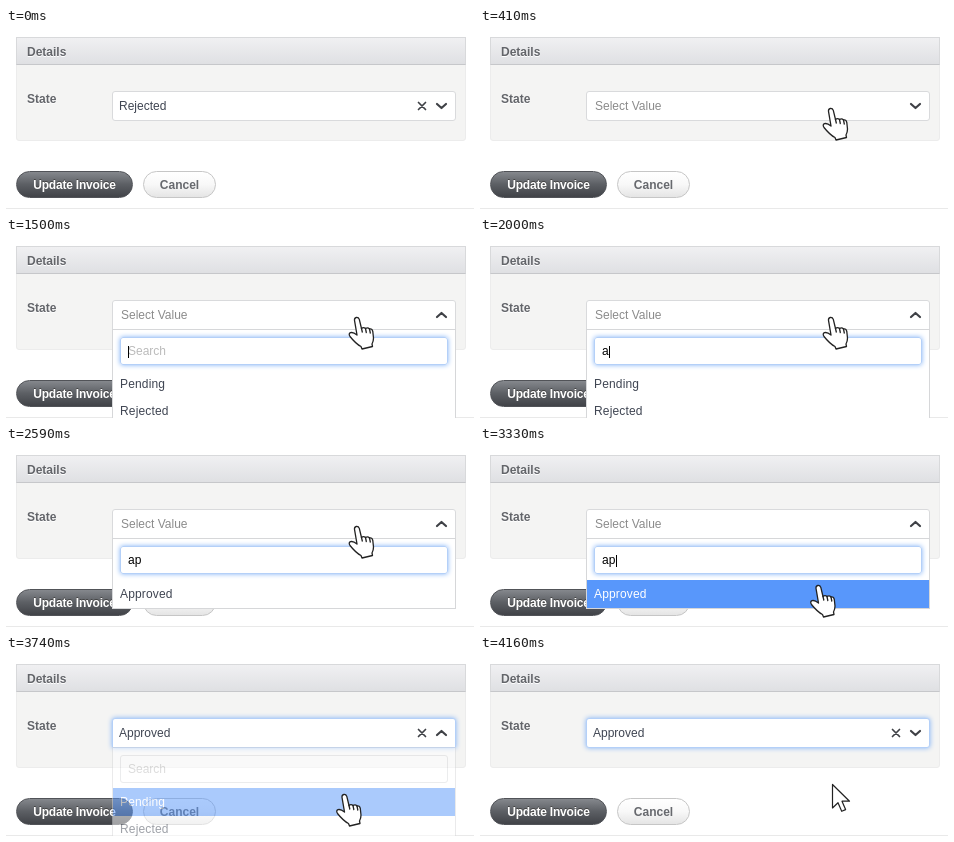
An HTML page that plays this animation: 468x181 px, repeating every 4.24 s.

```html
<!DOCTYPE html>
<html lang="en">
<head>
<meta charset="utf-8">
<title>State picker</title>
<style>
html, body { margin: 0; width: 100%; height: 100%; overflow: hidden; background: #fff; }
body { position: relative; font: 12px/14px "Liberation Sans", Arial, sans-serif; color: #3f4552; }
div, svg { position: absolute; box-sizing: border-box; white-space: pre; }
#panel { left: 10px; top: 9px; width: 450px; height: 104px; background: #f4f4f3; border: 1px solid #ececec; border-radius: 3px; }
#head { left: 10px; top: 9px; width: 450px; height: 28px; background: linear-gradient(#f0f0f2, #dfe0e3); border: 1px solid #d8d9db; border-bottom-color: #c6c7ca; }
.label { left: 21px; font-weight: bold; color: #63656a; text-shadow: 0 1px #fff; }
.button { top: 143px; height: 27px; border-radius: 14px; font-weight: bold; line-height: 26px; text-align: center; }
#update { left: 10px; width: 117px; color: #fff; background: linear-gradient(#85888d, #5c5f64 50%, #414348); border: 1px solid #515358; text-shadow: 0 -1px #444; letter-spacing: -.2px; }
#cancel { left: 137px; width: 73px; color: #67696e; background: linear-gradient(#fff, #f8f8f8 50%, #e5e5e5); border: 1px solid #c6c6c6; }
#rule { left: 0; top: 180px; width: 468px; height: 1px; background: #e9e9e9; }
#select { left: 106px; top: 63px; width: 344px; height: 30px; background: #fff; border: 1px solid #d9dadc; border-radius: 3px; }
#select.open { border-radius: 3px 3px 0 0; }
#select.glow { border-color: #b4d0f8; box-shadow: 0 0 5px #82b2f6; }
#value { left: 6px; top: 7px; }
#value.empty { left: 8px; color: #8b8b8b; }
#list { left: 106px; top: 92px; width: 344px; background: #fff; border: 1px solid #d6d7d9; overflow: hidden; }
#search { left: 7px; top: 7px; width: 328px; height: 28px; border: 1px solid #d9dadc; border-radius: 3px; line-height: 27px; padding-left: 7px; color: #000; }
#search.focus { border-color: #b4d0f8; box-shadow: 0 0 5px #82b2f6; }
#search.hint { color: #bbb; }
#caret { top: 16px; width: 1px; height: 12px; background: #000; }
.item { left: 0; width: 342px; height: 28px; padding-left: 7px; line-height: 28px; letter-spacing: .15px; }
.item.on { background: #5897fb; color: #fff; }
#art { left: 0; top: 0; }
</style>
</head>
<body>
<div id="panel"></div>
<div id="head"></div>
<div class="label" style="top:17px">Details</div>
<div class="label" style="top:64px">State</div>
<div class="button" id="update">Update Invoice</div>
<div class="button" id="cancel">Cancel</div>
<div id="rule"></div>
<div id="select"><div id="value"></div></div>
<div id="list">
  <div id="search"></div><div id="caret"></div>
  <div class="item" id="first"></div>
  <div class="item" id="second" style="top:67px">Rejected</div>
</div>
<svg id="art" width="468" height="181" fill="none" stroke-linejoin="round" stroke-linecap="round">
  <path id="clear" d="M412.5 74.5l7 7m0-7l-7 7" stroke="#3f4146" stroke-width="1.7"/>
  <path id="chevron" stroke="#3f4146" stroke-width="2.2"/>
  <g id="hand" stroke="#222" stroke-width="1.3">
    <path fill="#fff" d="M-2.6 3Q-3.2.8-1.2.3Q1 0 1.8 2.2L4 11.5Q6 9.8 8 11.5Q10.3 10 12 12Q14.6 11.3 15.3 14.5L16 21Q16 24.5 14.5 27L15 29.5L4.5 32L3.5 29.5Q-1.5 27-7 19.5Q-9.2 16.5-7.2 15.5Q-5-.5 0 0" style="display:none"/>
    <path fill="#fff" d="M-3 3.3Q-3.3.9-1.2.5Q1 .2 1.8 2.4L4 11.5Q6 9.8 8 11.5Q10.3 10 12 12Q14.6 11.3 15.3 14.5L16 21Q16 24.5 14.5 27L15 29.5L4.5 32L3.5 29.5Q-1.5 27-7.5 19.5Q-9.3 16.8-7 15.7Q-4.5 14.8-.5 18Z"/>
    <path d="M4 11.5l.8 3.5M8 11.5l.8 4M12 12l.8 4"/>
  </g>
  <path id="beam" d="M-3-7q3 0 3 2v10q0 2-3 2M3-7q-3 0-3 2v10q0 2 3 2" stroke="#333"/>
  <path id="arrow" d="M.5.5V24L6 18.7L9.7 27.3L13.6 25.6L10 17.2H17.5Z" fill="#fff" stroke="#222" stroke-width="1.2"/>
</svg>
<script>
const LOOP = 4240;
const $ = id => document.getElementById(id);
const show = (id, on) => $(id).style.display = on ? "" : "none";
const put = (id, text) => { if ($(id).textContent !== text) $(id).textContent = text; };
const within = (t, a, b) => t >= a && t < b;
const at = (steps, t) => steps.filter(s => s[0] <= t).pop();

const pointer = [
  [0, ""], [80, "hand", 416, 81], [240, "hand", 351.5, 80],
  [3090, "hand", 349, 88], [3170, "beam", 345, 114], [3250, "beam", 344, 125],
  [3330, "hand", 339, 139], [3830, "arrow", 340, 139], [3910, "arrow", 342, 137],
  [4000, "arrow", 346, 134], [4080, "arrow", 349, 131], [4160, "arrow", 352, 129]
];
const fade = [[0, 0], [490, .3], [570, .75], [650, 1], [3740, .5], [3830, 0]];
const carets = [[0, 0], [650, 1], [900, 0], [1500, 1], [2590, 0], [3090, 1], [3580, 0]];

function draw(t) {
  const chosen = t >= 3580;
  const empty = within(t, 160, 3580);
  const open = within(t, 490, 3830);
  const filtered = within(t, 2170, 3580);
  const typed = chosen || t < 2000 ? "" : t < 2340 ? "a" : "ap";

  put("value", chosen ? "Approved" : empty ? "Select Value" : "Rejected");
  $("value").className = empty ? "empty" : "";
  $("select").className = (open ? "open " : "") + (chosen || within(t, 80, 410) ? "glow" : "");
  show("clear", !empty);
  $("chevron").setAttribute("d", open ? "M431 80l4.5-4l4.5 4" : "M431 76l4.5 4l4.5-4");

  show("list", open);
  $("list").style.opacity = at(fade, t)[1];
  $("list").style.height = filtered ? "71px" : "100px";
  put("search", typed || "Search");
  $("search").className = (chosen ? "" : "focus ") + (typed ? "" : "hint");
  show("caret", at(carets, t)[1]);
  $("caret").style.left = 15 + 7 * typed.length + "px";
  put("first", filtered ? "Approved" : "Pending");
  $("first").className = t >= 3330 ? "item on" : "item";
  $("first").style.top = filtered ? "41px" : "40px";
  show("second", !filtered);

  const [, shape, x, y] = at(pointer, t);
  for (const id of ["hand", "beam", "arrow"]) show(id, id === shape);
  if (shape) $(shape).setAttribute("transform", `translate(${x} ${y})`);
}

function tick() {
  draw(performance.now() % LOOP);
  requestAnimationFrame(tick);
}
tick();
</script>
</body>
</html>
```
